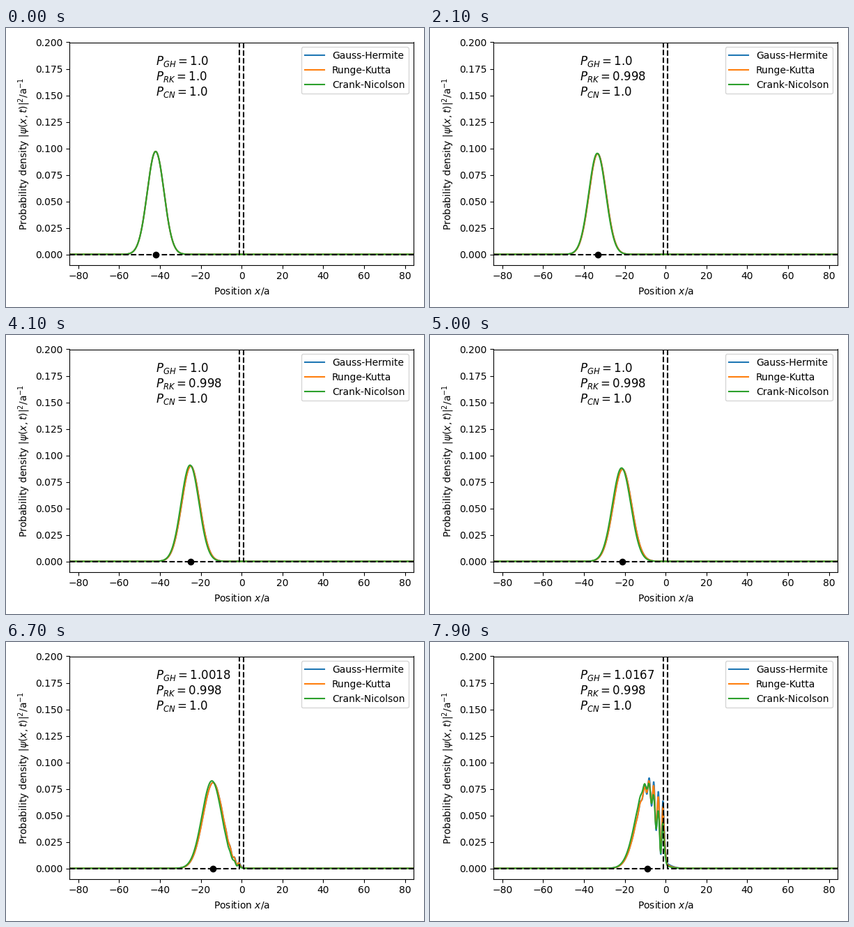
A matplotlib script for the animation above (8000 ms loop, 600 by 400 pixels).

```python
import numpy as np
import matplotlib.pyplot as plt
from matplotlib.animation import FuncAnimation

FRAMES = 80
DT = 1 / 3            # time units per frame
SUB = 12              # substeps per frame
L = 84.2              # half width of the box
X0, K0, SIGMA = -L / 2, 1.26, 4.11
V0, HALF = 1.0, 1.0   # barrier height and half width


def packet(x):
    amp = (2 * np.pi * SIGMA**2) ** -0.25
    return amp * np.exp(-((x - X0) / (2 * SIGMA)) ** 2 + 1j * K0 * x)


def barrier(x):
    dx = x[1] - x[0]
    return np.clip((HALF - np.abs(x)) / dx + 0.5, 0, 1)


def gh_norm(t):
    """Norm drift of the Gauss-Hermite solution, t in frames."""
    return 1 + np.exp(-9.21 + 0.321 * (t - 58) - 0.00645 * (t - 58) * (t - 67))


def rk_norm(t):
    return 0.998 + 0.002 * np.exp(-t / 2.2)


def spectral(x, norm=None):
    """Split-step densities; norm(t) feeds growth in at the barrier."""
    dx, h = x[1] - x[0], DT / SUB
    k = 2 * np.pi * np.fft.fftfreq(x.size, dx)
    wall = barrier(x)
    half_v = np.exp(-0.5j * V0 * wall * h)
    kinetic = np.exp(-0.5j * k**2 * h)
    psi, out = packet(x), []
    for n in range(FRAMES):
        out.append(np.abs(psi) ** 2)
        for s in range(SUB):
            psi = half_v * np.fft.ifft(kinetic * np.fft.fft(half_v * psi))
            if norm:
                rho = np.abs(psi) ** 2 * dx
                missing = norm(n + (s + 1) / SUB) - rho.sum()
                gain = np.clip(missing / ((rho * wall).sum() + 1e-12), 0, 0.03)
                psi = psi * np.sqrt(1 + gain * wall)
    return out


def finite_difference(x):
    """Densities from the three-point Hamiltonian on the grid."""
    dx = x[1] - x[0]
    off = np.full(x.size - 1, -0.5 / dx**2)
    ham = np.diag(1 / dx**2 + V0 * barrier(x)) + np.diag(off, 1) + np.diag(off, -1)
    energy, modes = np.linalg.eigh(ham)
    coef = modes.T @ packet(x)
    return [np.abs(modes @ (coef * np.exp(-1j * energy * DT * n))) ** 2
            for n in range(FRAMES)]


x_fine = np.linspace(-L, L, 1024, endpoint=False)
x_grid = np.linspace(-L, L, 600)
rk = [rho * rk_norm(n) for n, rho in enumerate(spectral(x_fine))]
densities = [spectral(x_fine, gh_norm), rk, finite_difference(x_grid)]

fig, ax = plt.subplots(figsize=(6, 4), dpi=100)
curves = [ax.plot(x, rho[0], label=name)[0] for x, rho, name in zip(
    (x_fine, x_fine, x_grid), densities,
    ("Gauss-Hermite", "Runge-Kutta", "Crank-Nicolson"))]
ax.plot([-L, -HALF, -HALF, HALF, HALF, L], [0, 0, V0, V0, 0, 0], "k--")
ball, = ax.plot([X0], [0], "ko")
labels = [ax.text(X0, y, "", fontsize=12) for y in (0.1785, 0.1640, 0.1498)]
ax.set_xlim(-L, L)
ax.set_ylim(-0.01, 0.2)
ax.set_xlabel("Position $x$/a")
ax.set_ylabel(r"Probability density $|\psi(x,t)|^2$/a$^{-1}$")
ax.legend(loc="upper right")
fig.tight_layout()


def update(n):
    for curve, rho in zip(curves, densities):
        curve.set_ydata(rho[n])
    ball.set_xdata([X0 + K0 * DT * n])
    norms = (gh_norm(n), rk_norm(n), 1.0)
    for label, tag, p in zip(labels, ("GH", "RK", "CN"), norms):
        label.set_text(f"$P_{{{tag}}}={round(float(p), 4)}$")
    return [*curves, ball, *labels]


anim = FuncAnimation(fig, update, frames=FRAMES, interval=100,
                     repeat=True, repeat_delay=0)
plt.show()
```
